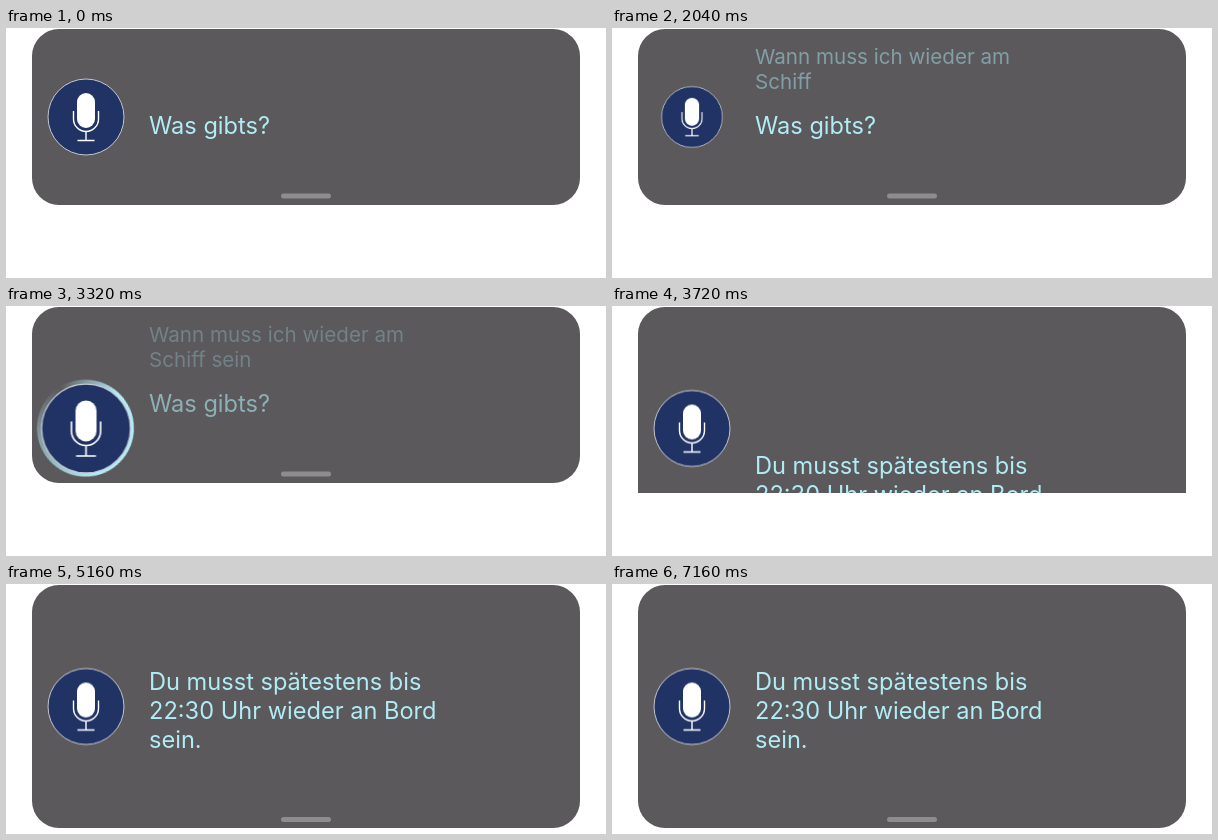
Recreate the animation shown at these times as an HTML page. Size 600 px wide and 250 px high, loop 7.56 s.

```html
<!DOCTYPE html>
<html lang="de">
<head>
<meta charset="utf-8">
<style>
  html, body { margin: 0; width: 100%; height: 100%; overflow: hidden; background: #fff; }
  #stage { position: relative; width: 600px; height: 250px; overflow: hidden; }
  #stage > *, #bubble > * { position: absolute; }
  .layer { left: 0; top: 0; width: 600px; height: 250px; }
  .card { fill: #5b595b; }
  .grip { fill: #8d8c8e; }
  text { font-family: Inter, "Open Sans", sans-serif; font-size: 23.6px; fill: #b0ecf5; white-space: pre; }
  .ask { font-size: 20.6px; fill: #829fa7; }
  #bubble { left: 41px; top: 50px; width: 78px; height: 78px; }
  #ring {
    inset: -2.6px; border-radius: 50%;
    background: conic-gradient(from 75deg, #b4edf800, #b4edf8 75deg, #b4edf8 200deg, #b4edf880 285deg, #b4edf800);
  }
  #face { left: 0; top: 0; }
</style>
</head>
<body>
<div id="stage">
  <svg class="layer">
    <g id="small">
      <rect class="card" x="26" y="1" width="548" height="176" rx="27"/>
      <rect class="grip" x="275" y="165.5" width="50" height="5" rx="2.5"/>
    </g>
    <g id="old">
      <g id="query">
        <text class="ask" x="143" y="47"><tspan>Wann</tspan><tspan> muss</tspan><tspan> ich</tspan><tspan> wieder</tspan><tspan> am</tspan></text>
        <text class="ask" x="143" y="71.5"><tspan>Schiff</tspan><tspan> sein</tspan></text>
      </g>
      <text x="143" y="105.5">Was gibts?</text>
    </g>
  </svg>
  <svg class="layer" id="large">
    <rect class="card" x="26" y="1" width="548" height="243" rx="27"/>
    <rect class="grip" x="275" y="233" width="50" height="5" rx="2.5"/>
    <g id="answer">
      <text x="143" y="106">Du musst spätestens bis</text>
      <text x="143" y="134.7">22:30 Uhr wieder an Bord</text>
      <text x="143" y="163.5">sein.</text>
    </g>
  </svg>
  <div id="bubble">
    <div id="ring"></div>
    <svg id="face" width="78" height="78" fill="none" stroke="#fff" stroke-width="1.4">
      <circle cx="39" cy="39" r="38" fill="#203364" stroke="#c3c6d0" stroke-width="1"/>
      <rect x="30" y="15" width="18" height="35" rx="9" fill="#fff" stroke="none"/>
      <path d="M26.5 33v8a12.5 12.5 0 0 0 25 0v-8M39 53.5v9M30.5 62.5h17"/>
    </svg>
  </div>
</div>
<script>
  const LOOP = 7560;
  const $ = id => document.getElementById(id);

  // keys: [time in ms, value, easing towards the next key]
  function play(el, prop, keys) {
    const all = [[0, keys[0][1]], ...keys, [LOOP, keys[keys.length - 1][1]]];
    el.animate(
      all.map(([t, value, easing = 'linear']) => ({ offset: t / LOOP, [prop]: value, easing })),
      { duration: LOOP, iterations: Infinity }
    ).startTime = 0;
  }
  const hold = 'step-end', soft = 'ease-in-out';
  const zero = document.timeline.currentTime || 0;

  // Spoken words arrive one by one
  const spoken = [760, 920, 1080, 1320, 1520, 1880, 2060];
  document.querySelectorAll('tspan').forEach((word, i) =>
    play(word, 'fillOpacity', [[spoken[i], 0], [spoken[i] + 120, 1]]));
  play($('query'), 'transform', [[0, 'translateY(0px)', hold], [1880, 'translateY(-11px)']]);
  play($('old'), 'opacity', [[3240, 1], [3440, 0]]);

  // Microphone: shrinks while listening, swells while thinking
  const pose = (y, s) => `translateY(${y}px) scale(${s})`;
  play($('bubble'), 'transform', [
    [760, pose(0, 1), soft], [1120, pose(0, .8)],
    [2560, pose(0, .8)], [2760, pose(0, .95)], [3060, pose(0, 1.17), soft],
    [3300, pose(33.5, 1.17), soft], [3560, pose(33.5, 1)]
  ]);
  play($('ring'), 'opacity', [[2560, 0], [2700, 1], [3320, 1], [3520, 0]]);
  play($('ring'), 'transform', [[2760, 'rotate(0deg)'], [3560, 'rotate(360deg)']]);

  // Answer card unrolls while its text slides up
  play($('small'), 'opacity', [[0, 1, hold], [3620, 0]]);
  play($('large'), 'opacity', [[0, 0, hold], [3620, 1]]);
  play($('large'), 'clipPath', [[3620, 'inset(0px 0px 73px 0px)', soft], [4000, 'inset(0px 0px 5px 0px)']]);
  play($('answer'), 'transform', [[3550, 'translateY(120px)', soft], [3900, 'translateY(0px)']]);

  document.getAnimations().forEach(a => { a.startTime = zero; });
</script>
</body>
</html>
```
